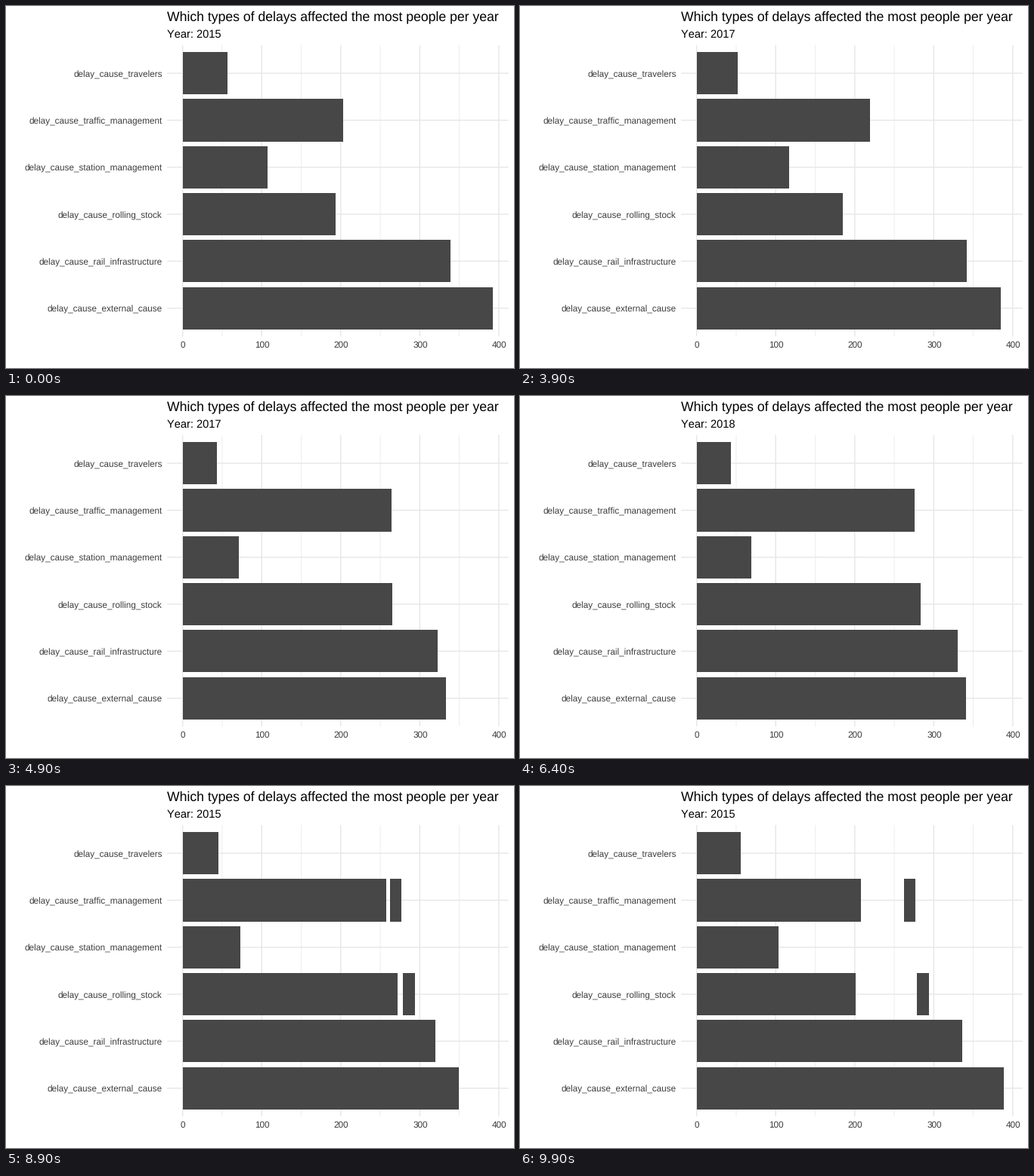
Animation of 672x480 px, one loop 10000 ms. Source, as a matplotlib script:

```python
import matplotlib.pyplot as plt
import numpy as np
from matplotlib.animation import FuncAnimation

plt.rcParams["font.family"] = "Liberation Sans"
plt.rcParams["text.hinting"] = "none"
plt.rcParams["text.kerning_factor"] = 6  # plain advances, no pair kerning

W, H, DPI = 672, 480, 96
LEFT, RIGHT, TOP, BOTTOM = 213.2, 664.7, 51.8, 438.1
X0, UNIT = 233.7, 1.0455
STEP = (BOTTOM - TOP) / 6.2
BAR_H = 0.9 * STEP
BAR, GRID, LABEL = "#474747", "#e7e7e7", "#3e3e3e"

CAUSES = ["travelers", "traffic_management", "station_management",
          "rolling_stock", "rail_infrastructure", "external_cause"]

TOTAL = {
    2015: np.array([57, 203, 107, 193.6, 339, 392.8]),
    2016: np.array([52.7, 214.4, 121.7, 176.5, 343.6, 389.8]),
    2017: np.array([43.5, 275.2, 69.2, 282.7, 331.2, 340.3]),
    2018: np.array([45, 277, 73.2, 294.2, 320, 349.3]),
}
# Part of each stack that also exists in 2015 and 2016
CORE_2017 = np.array([42.2, 269.2, 66.3, 273.6, 320.7, 328])
CORE_2018 = np.array([43.9, 262.4, 70.1, 278.7, 304.5, 341])

# first frame, last frame, from, to, target year
MOVES = [
    (12, 25, TOTAL[2015], TOTAL[2016], 2016),
    (38, 50, TOTAL[2016], CORE_2017, 2017),
    (63, 75, TOTAL[2017], TOTAL[2018], 2018),
    (88, 100, CORE_2018, TOTAL[2015], 2015),
]


def state(i):
    """Year, bar lengths and whether the leaving 2018 pieces are visible."""
    year = 2015
    for start, end, a, b, target in MOVES:
        if start < i < end:
            t = (i - start) / (end - start)
            return target, a + (b - a) * t, target == 2015
        if i >= end:
            year = target
    return year, TOTAL[year], False


fig = plt.figure(figsize=(W / DPI, H / DPI), dpi=DPI, facecolor="white")
ax = fig.add_axes([0, 0, 1, 1])
ax.set_xlim(0, W)
ax.set_ylim(H, 0)
ax.axis("off")


def px(value):
    return X0 + value * UNIT


def rule(xs, ys, width):
    ax.plot(xs, ys, color=GRID, lw=width * 72 / DPI, snap=False,
            solid_capstyle="butt", zorder=1)


def write(x, y, s, size, color="black", ha="left"):
    return ax.text(x, y, s, fontsize=size, color=color, ha=ha, va="baseline")


def bar(y):
    r = plt.Rectangle((X0, y - BAR_H / 2), 0, BAR_H, fc=BAR, lw=0,
                      snap=True, zorder=2)
    return ax.add_patch(r)


for v in range(50, 400, 100):
    rule([px(v)] * 2, [TOP, BOTTOM], 0.71)
for v in range(0, 401, 100):
    rule([px(v)] * 2, [TOP, BOTTOM], 1.42)
    write(px(v) + 0.5, 453, str(v), 8.8, LABEL, "center")

rows = TOP + STEP * (0.6 + np.arange(len(CAUSES)))
for y, cause in zip(rows, CAUSES):
    rule([LEFT, RIGHT], [y, y], 1.42)
    write(206.6, y + 5, "delay_cause_" + cause, 8.8, LABEL, "right")

bars = [bar(y) for y in rows]
tails = [bar(y) for y in rows]
for tail, a, b in zip(tails, CORE_2018, TOTAL[2018]):
    tail.set_x(px(a))
    tail.set_width((b - a) * UNIT)

write(LEFT, 19.2, "Which types of delays affected the most people per year", 13.2)
subtitle = write(LEFT, 41.7, "", 11)


def draw(i):
    year, lengths, leaving = state(i)
    subtitle.set_text(f"Year: {year}")
    for b, tail, v in zip(bars, tails, lengths):
        b.set_width(v * UNIT)
        tail.set_visible(leaving)
    return [subtitle, *bars, *tails]


anim = FuncAnimation(fig, draw, frames=100, interval=100, repeat=True,
                     repeat_delay=0, blit=False)
plt.show()
```
